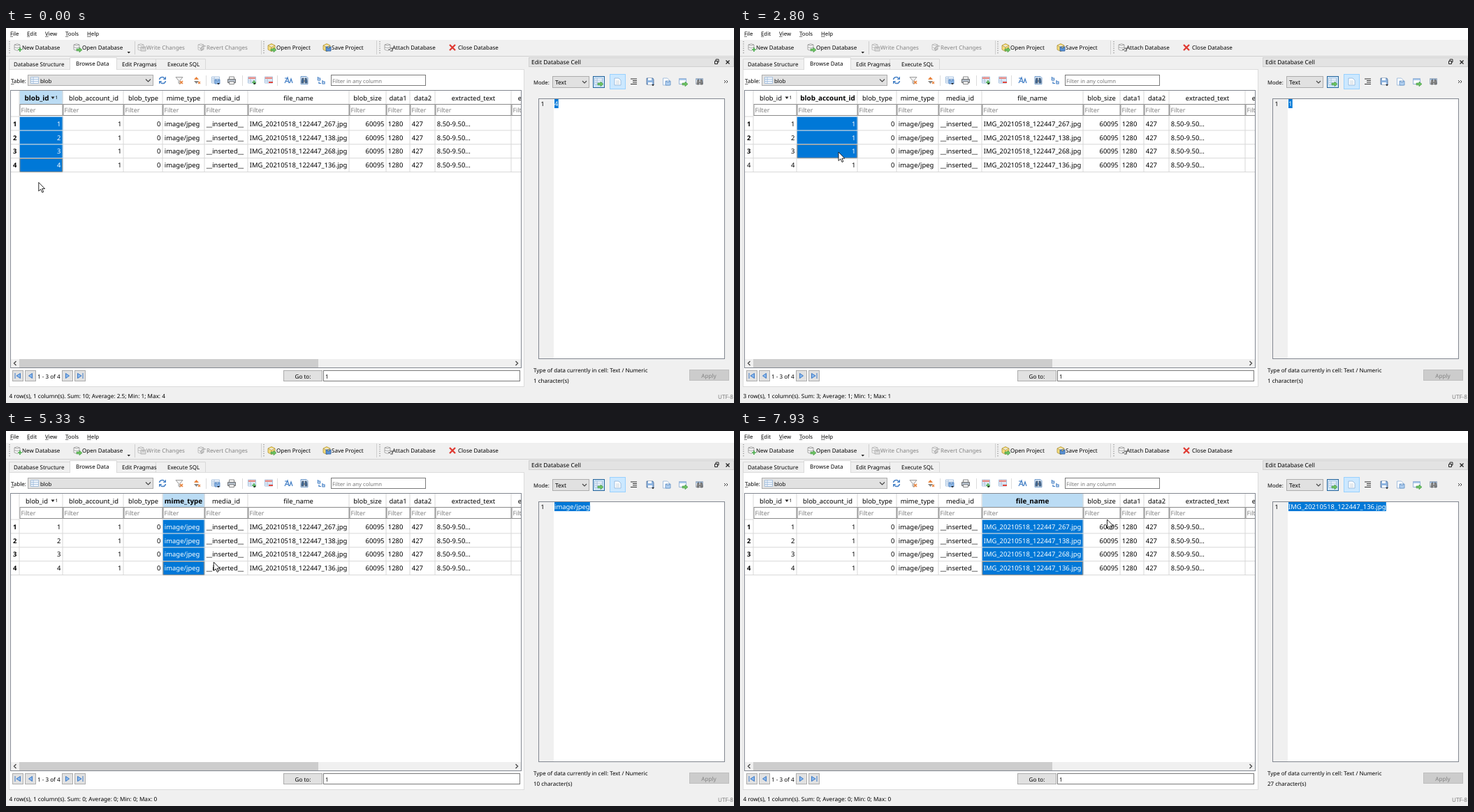
An HTML page for the animation above (8 s loop, 1042 px wide and 538 px high).

```html
<!DOCTYPE html>
<html lang="en">
<head>
<meta charset="utf-8">
<title>Browse data</title>
<style>
  html, body { margin: 0; width: 100%; height: 100%; overflow: hidden; background: #f0f0f0; }
  svg { display: block; width: 1042px; height: 538px; }
  text { font-family: "Noto Sans", "Open Sans", sans-serif; text-rendering: geometricPrecision; white-space: pre; }
</style>
</head>
<body>
<svg id="stage" viewBox="0 0 1042 538" xmlns="http://www.w3.org/2000/svg"></svg>
<script>
const stage = document.getElementById('stage');
const BLUE = '#0078d7', GRID = '#d8d8d8', EDGE = '#adadad', GREY = '#838383';
let layer = stage;

function add(tag, attrs, parent = layer) {
  const el = document.createElementNS(stage.namespaceURI, tag);
  for (const key in attrs) el.setAttribute(key, attrs[key]);
  parent.appendChild(el);
  return el;
}
const box = (x, y, w, h, fill, stroke) => stroke
  ? add('rect', { x: x + .5, y: y + .5, width: w - 1, height: h - 1, fill, stroke })
  : add('rect', { x, y, width: w, height: h, fill });
const path = (d, fill = 'none', stroke = 'none', width = 1) =>
  add('path', { d, fill, stroke, 'stroke-width': width });
function label(x, y, str, size = 8.1, fill = '#000', anchor = 'start') {
  const el = add('text', { x, y, fill, 'font-size': size, 'text-anchor': anchor });
  el.textContent = str;
  return el;
}
function icon(x, y, ...shapes) {
  const outer = layer;
  layer = add('g', { transform: `translate(${x} ${y})` });
  shapes.forEach(s => path(...s));
  layer = outer;
}

// Icon parts, drawn around their centre
const sheet = ['M-4.5-5h6l3 3v7h-9z', '#fff', '#8fb0d6', .8];
const grid = ['M-5.5-5h11v9h-11zM-5.5-2h11M-5.5 1h11M-2-5v9', '#f1f6fc', '#8fb0d6', .7];
const drum = ['M-5-4q4-2.5 8 0v7q-4 2.5-8 0zM-5-4q4 2.5 8 0M-5-.5q4 2.5 8 0', '#f6f6f6', '#8c8c8c', .7];
const cube = ['M0-5.5l5 2.5v6l-5 2.5l-5-2.5v-6zM-5-3l5 2.5l5-2.5M0-.5v6', '#f5dc7c', '#b0953a', .8];
const disk = (fill, edge) => ['M-1-1h7v6h-7zM1-1v2h3v-2', fill, edge, .8];
const plus = ['M3 0v6M0 3h6', 'none', '#4cae4f', 1.7];
const arrow = ['M-1 2h4v-2l4 3.4l-4 3.4v-2h-4z', '#6cc35f', '#3c8f40', .6];
const cross = (r, w) => [`M${-r} ${-r}L${r} ${r}M${r} ${-r}L${-r} ${r}`, 'none', '#e03a32', w];
const glasses = color => ['M-4 1l1-4h2v4h2v-4h2l1 4v3h-3v-3h-2v3h-3z', color, '#444', .6];
const drop = ['M2 4h4l-2 2.3z', '#222'];

function menuBar() {
  box(0, 0, 1042, 17, '#fff');
  [[6, 'File', 4], [30, 'Edit', 4.3], [56, 'View', 4.7], [85, 'Tools', 4.3], [116, 'Help', 5.7]].forEach(([x, s, w]) => {
    label(x, 10.8, s, 7.8);
    path(`M${x} 12.3h${w}`, 'none', '#333', .7);
  });
}

function toolBar() {
  const grip = x => add('path', { d: `M${x} 19v19`, stroke: '#999', 'stroke-width': 1.4, 'stroke-dasharray': '1.2 2' });
  [5, 369, 535].forEach(grip);
  path('M0 40.5h1042M184.5 19v19M365.5 18v20M530.5 18v20', 'none', '#cfcfcf');
  [[23, 'New Database'], [109, 'Open Database'], [201, 'Write Changes', GREY], [287, 'Revert Changes', GREY],
   [387, 'Open Project'], [466, 'Save Project'], [553, 'Attach Database'], [647, 'Close Database']]
    .forEach(([x, s, fill]) => label(x, 31, s, 8, fill));
  icon(17, 28, drum, plus);
  icon(102, 28, drum, arrow);
  path('M173.5 34h4.5l-2.25 2.5z', '#222');
  icon(194, 28, [drum[0], '#f4f4f4', '#b3b3b3', .8], disk('#ddd', '#aaa'));
  icon(280, 28, [drum[0], '#f4f4f4', '#b3b3b3', .8], ['M6-2q-7-1-6 4M-2 1l2 3l3-3', 'none', '#aaa', 1.2]);
  icon(380, 28, cube, arrow);
  icon(459, 28, cube, disk('#5b93d6', '#2b5c9b'));
  icon(547, 28, drum, ['M0 3h3M3 1h3v4h-3', 'none', '#555', 1.2]);
  icon(639, 28, cross(4, 2.3));
}

function tabs() {
  box(4, 59, 738, 456, '#fff', '#dcdcdc');
  path('M4.5 59v-14.5H91M158.5 44.5H285.5V59M214.5 44.5V59', 'none', '#d9d9d9');
  path('M91.5 60v-17.5H158.5V60', '#fff', '#d9d9d9');
  [[11, 'Database Structure'], [100, 'Browse Data'], [166, 'Edit Pragmas'], [231, 'Execute SQL']]
    .forEach(([x, s], i) => label(x, i === 1 ? 54 : 55, s, 8));
}

function browseBar() {
  label(7, 78.5, 'Table:', 8);
  path('M7 80.5h4.5', 'none', '#333', .7);
  box(31, 67, 180, 16, '#e1e1e1', EDGE);
  icon(41, 75.5, grid);
  label(49, 78.5, 'blob', 7.8);
  path('M200 73.5l3.5 3.5l3.5-3.5', 'none', '#444', 1.1);
  path('M286.5 68v15M338.5 68v15M388.5 68v15', 'none', '#dcdcdc');

  icon(224, 75, ['M-4.5-1q1-4 5-3.5l2 1M4.5 1q-1 4-5 3.5l-2-1', 'none', '#4a84c8', 1.6],
    ['M5-5.5v4.5h-4.5zM-5 5.5v-4.5h4.5z', '#4a84c8']);
  icon(248, 75, ['M-5-4.5h10l-4 5v5l-2-1.5v-3.5z', '#eee', '#888', .8],
    ['M1 1l4 4M5 1l-4 4', 'none', '#e8823a', 1.6]);
  icon(273, 75, ['M-4-1l3.5-4l3.5 4z', '#e8823a'], ['M-4 1h7l-3.5 4z', '#888'], ['M2 2l3 3M5 2l-3 3', 'none', '#e8823a', 1.1]);
  icon(300, 75, grid, disk('#8fb9e8', '#4a7fbd'), drop);
  icon(323, 75, ['M-3.5-5h7v4h-7z', '#fff', '#666', .8], ['M-5.5-1.5h11v5h-11z', '#b4bec9', '#555', .8],
    ['M-3.5 2h7v3.5h-7z', '#fff', '#666', .8]);
  icon(352, 75, grid, ['M-5-4.5h10v2.5h-10z', '#ec9089'], plus, drop);
  icon(376, 75, grid, ['M-5-4.5h10v2.5h-10z', '#ec9089'], ['M0 3h6', 'none', '#e0483f', 2]);
  icon(404, 75, ['M-5 4l4-8l2 8M-4 1.5h5M2 4l2-6l2 6M-5-3h3', 'none', '#3f7cc4', 1.2]);
  icon(427, 75, ['M-5-5.5h8l2 2v9h-10z', '#cfe2f6', '#5c8cc0', .8], glasses('#3d6ba0'));
  icon(451, 75, ['M-4.5-5v5h3v-3h-3M2 0v5h3v-3h-3M-3 2v2.5h3', 'none', '#3f7cc4', 1.2]);
  box(465, 67, 136, 16, '#fff', '#7a7a7a');
  label(467, 78.5, 'Filter in any column', 7.7, '#777');
}

// Columns: left edge, title, title centre, right-aligned, cell text by row
const shots = [267, 138, 268, 136].map(n => `IMG_20210518_122447_${n}.jpg`);
const same = s => [s, s, s, s];
const columns = [
  [19.5, 'blob_id', 44, true, ['1', '2', '3', '4']],
  [81.5, 'blob_account_id', 125.5, true, same('1')],
  [168.5, 'blob_type', 196.5, true, same('0')],
  [224.5, 'mime_type', 254, false, same('image/jpeg')],
  [284.5, 'media_id', 315, false, same('__inserted__')],
  [346.5, 'file_name', 418.5, false, shots],
  [491.5, 'blob_size', 517.5, true, same('60095')],
  [544.5, 'data1', 561, false, same('1280')],
  [578.5, 'data2', 596.5, false, same('427')],
  [614.5, 'extracted_text', 669, false, same('8.50-9.50...')],
  [723.5, 'extra', 744, false, same('')]
];
const rightEdge = i => i + 1 < columns.length ? columns[i + 1][0] : 790;
const rowTop = r => 127.5 + 19.9 * r;
const heads = [], cells = [], rowNums = [];
let focusRect;

function table() {
  box(6, 89, 732, 399, '#fff', '#828790');
  const clip = add('clipPath', { id: 'view' });
  add('rect', { x: 7, y: 90, width: 730, height: 385 }, clip);
  const outer = layer;
  layer = add('g', { 'clip-path': 'url(#view)' });

  columns.forEach(([x, title, mid, right, values], c) => {
    const end = rightEdge(c);
    const fill = box(x, 90, end - x, 19, '#bbdcf4');
    heads.push({ fill, text: label(mid, 103.5, title, 9.4, '#000', 'middle') });
    cells.push(values.map((s, r) => ({
      fill: box(x, rowTop(r), end - x, 19.9, BLUE),
      text: label(right ? end - 3 : x + 2.3, rowTop(r) + 13.1, s, 9.45, '#000', right ? 'end' : 'start')
    })));
  });
  path('M64.5 98.5h5l-2.5 3.5z', '#222');
  label(70.5, 102, '1', 6.5);

  let lines = 'M7 127H19';
  for (let r = 1; r < 5; r++) lines += `M7 ${rowTop(r) - .5}H790`;
  columns.forEach(([x]) => lines += `M${x - .5} 90V207`);
  path(lines, 'none', GRID);
  columns.forEach(([x], c) => {
    box(x, 109, rightEdge(c) - x, 17, '#fff', '#8a8a8a');
    label(x + 2, 121, 'Filter', 8.8, '#7d7d7d');
  });
  for (let r = 0; r < 4; r++) rowNums.push(label(12.8, rowTop(r) + 13.1, r + 1, 9.4, '#000', 'middle'));
  focusRect = add('rect', { height: 19, fill: 'none', stroke: '#a58b70', 'stroke-width': .7 });
  layer = outer;

  box(7, 475, 730, 12, '#f0f0f0');
  box(19, 475, 428, 12, '#cdcdcd');
  path('M14.5 478l-3 3l3 3M729.5 478l3 3l-3 3', 'none', '#444', 1.3);
}

function navBar() {
  const arrows = [
    [9, 'M-4-4v8M3.5-3.5l-5.500 3.5l5.500 3.5z'], [27, 'M2.5-3.5l-5 3.5l5 3.5z'],
    [80, 'M-2.5-3.5l5 3.5l-5 3.5z'], [98, 'M4-4v8M-3.5-3.5l5.500 3.5l-5.500 3.5z']
  ];
  arrows.forEach(([x, d]) => {
    box(x, 491, 16, 16, '#e1e1e1', EDGE);
    icon(x + 8, 499, [d, '#8dbbf0', '#3b78c4', 1]);
  });
  label(45, 502.5, '1 - 3 of 4', 8.1);
  box(397, 491, 56, 16, '#e1e1e1', EDGE);
  label(425, 502.5, 'Go to:', 8.1, '#000', 'middle');
  box(454, 491, 282, 16, '#fff', '#7a7a7a');
  label(457, 502.5, '1', 8.1);
}

function sidePanel() {
  box(748, 42, 294, 14, '#e3e3e3', '#d0d0d0');
  label(752, 52, 'Edit Database Cell', 8.4);
  path('M1014.5 47.5h4v4h-4zM1016 47v-2h4v4h-2', 'none', '#222', 1);
  path('M1030.5 46.5l5 5M1035.5 46.5l-5 5', 'none', '#222', 1.3);

  label(755, 80.5, 'Mode:', 7.7);
  box(782, 69, 53, 17, '#e1e1e1', EDGE);
  label(786, 80.5, 'Text', 8.4);
  path('M825 76l3 3l3-3', 'none', '#444', 1.1);
  box(840, 69, 17, 17, '#cce4f7', '#26649b');
  icon(848, 77, grid, arrow);
  box(864, 66, 23, 22, '#cce8ff', '#99d1ff');
  icon(875.5, 77, sheet, ['M-2.5-1h5M-2.5 1h5M-2.5 3h5', 'none', '#abc', .6]);
  icon(898, 77, ['M-4-4h9M-1-1.5h6M-1 1h6M-4 3.5h9', 'none', '#333', 1.1]);
  icon(922, 77, ['M-5-5h9l1 2v7h-10z', '#8fb5e0', '#4a6a94', .8], ['M-3-5h5v3h-5zM-3 1h6v3h-6z', '#fff'], drop);
  icon(945, 77, sheet, disk('#b4d2f2', '#5c8cc0'));
  icon(969, 77, ['M-5.5-4.5h10v8h-10z', '#fff', '#7fa3cf', .8], ['M-5-4h9v2h-9z', '#a9c8ea'], arrow);
  icon(993, 77, ['M-5.5-4.5h10v8h-10z', '#fff', '#8a9bb0', .8], ['M-5-4h9v2h-9z', '#a9c8ea'], glasses('#888'));
  path('M1028 75l2 2l-2 2M1031 75l2 2l-2 2', 'none', '#333', .9);

  box(762, 101, 267, 374, '#fff', '#828790');
  box(763, 102, 21, 372, '#f0f0f0');
  label(765.5, 112.3, '1', 8.8);
  label(755, 494.3, 'Type of data currently in cell: Text / Numeric', 7.95);
  box(978, 490, 57, 16, '#cccccc', '#bfbfbf');
  label(1006, 501.5, 'Apply', 8.1, GREY, 'middle');
  label(1019, 531.5, 'UTF-8', 8.1, '#7a7a7a');
}

menuBar();
toolBar();
tabs();
browseBar();
table();
navBar();
sidePanel();
const mark = box(785, 102, 6, 13, BLUE);
const editText = label(785, 112.3, '', 9.45, '#fff');
const countText = label(755, 508.8, '', 8);
const status = label(4.5, 531, '', 8.2);
const cursor = add('path', {
  d: 'M0 0V12.5L2.9 9.8L5 14.4L6.9 13.6L4.9 9.1H8.8Z',
  fill: '#fff', stroke: '#111', 'stroke-width': .9
});

// Pointer path: tick (1/15 s), x, y, easing used to arrive
const linear = k => k;
const smooth = k => k * k * (3 - 2 * k);
const out = k => 1 - (1 - k) ** 2;
const route = [
  [0, 46.8, 221.5], [7, 46.8, 221.5], [20, 145, 139.5, smooth], [23, 161, 138], [24, 161, 138],
  [28, 196, 132, out], [33, 144, 129, smooth], [38, 144, 129], [42, 141, 178], [44, 140.5, 199, out],
  [45, 140.5, 199], [46, 140.5, 199.8], [50, 140.5, 199.8], [62, 254.8, 134.5, smooth],
  [66, 254.8, 134.5], [74, 256.5, 200, smooth], [79, 256.5, 200], [80, 297.3, 188],
  [88, 411.2, 134.5, out], [96, 411.2, 134.5], [104, 414.5, 190, smooth], [108, 414.5, 190],
  [113, 557.5, 130, smooth], [115, 557.5, 130], [119, 525.5, 127, smooth], [120, 525.5, 127]
];
// Drag selections: column, first tick, last tick
const drags = [[0, 0, 0], [1, 37, 44], [3, 66, 74], [5, 94, 104]];

function pointer(tick) {
  const i = Math.max(1, route.findIndex(p => p[0] >= tick));
  const [t0, x0, y0] = route[i - 1], [t1, x1, y1, ease = linear] = route[i];
  const k = ease((tick - t0) / (t1 - t0));
  return [x0 + (x1 - x0) * k, y0 + (y1 - y0) * k];
}

function summary(col, n) {
  if (n < 2) return '';
  const nums = columns[col][4].slice(0, n).map(s => Number(s) || 0);
  const sum = nums.reduce((a, b) => a + b);
  return `${n} row(s), 1 column(s). Sum: ${sum}; Average: ${sum / n}; Min: ${Math.min(...nums)}; Max: ${Math.max(...nums)}`;
}

function draw(tick) {
  const [x, y] = pointer(tick);
  cursor.setAttribute('transform', `translate(${x} ${y})`);

  const [col, , last] = drags.filter(d => d[1] <= tick).pop();
  const dragY = pointer(Math.min(tick, last))[1];
  const n = Math.min(4, 1 + Math.floor((dragY - 127) / 20));

  heads.forEach(({ fill, text }, c) => {
    const on = c === col;
    fill.setAttribute('visibility', on && n === 4 ? 'visible' : 'hidden');
    text.setAttribute('font-weight', on ? 700 : 400);
    text.setAttribute('font-size', on ? 9.9 : 9.4);
  });
  cells.forEach((list, c) => list.forEach(({ fill, text }, r) => {
    const on = c === col && r < n;
    fill.setAttribute('visibility', on ? 'visible' : 'hidden');
    text.setAttribute('fill', on ? '#fff' : '#000');
  }));
  rowNums.forEach((el, r) => el.setAttribute('font-weight', r < n ? 700 : 400));
  focusRect.setAttribute('x', columns[col][0] + .5);
  focusRect.setAttribute('y', rowTop(n - 1) + .2);
  focusRect.setAttribute('width', rightEdge(col) - columns[col][0] - 1.5);

  const value = columns[col][4][n - 1];
  editText.textContent = value;
  mark.setAttribute('width', editText.getComputedTextLength() + .3);
  countText.textContent = `${value.length} character(s)`;
  status.textContent = summary(col, n);
}

let shown = -1;
function frame() {
  const tick = Math.floor((performance.now() % 8000 + 4) * .015) % 120;
  if (tick !== shown) draw(shown = tick);
  requestAnimationFrame(frame);
}
frame();
</script>
</body>
</html>
```
